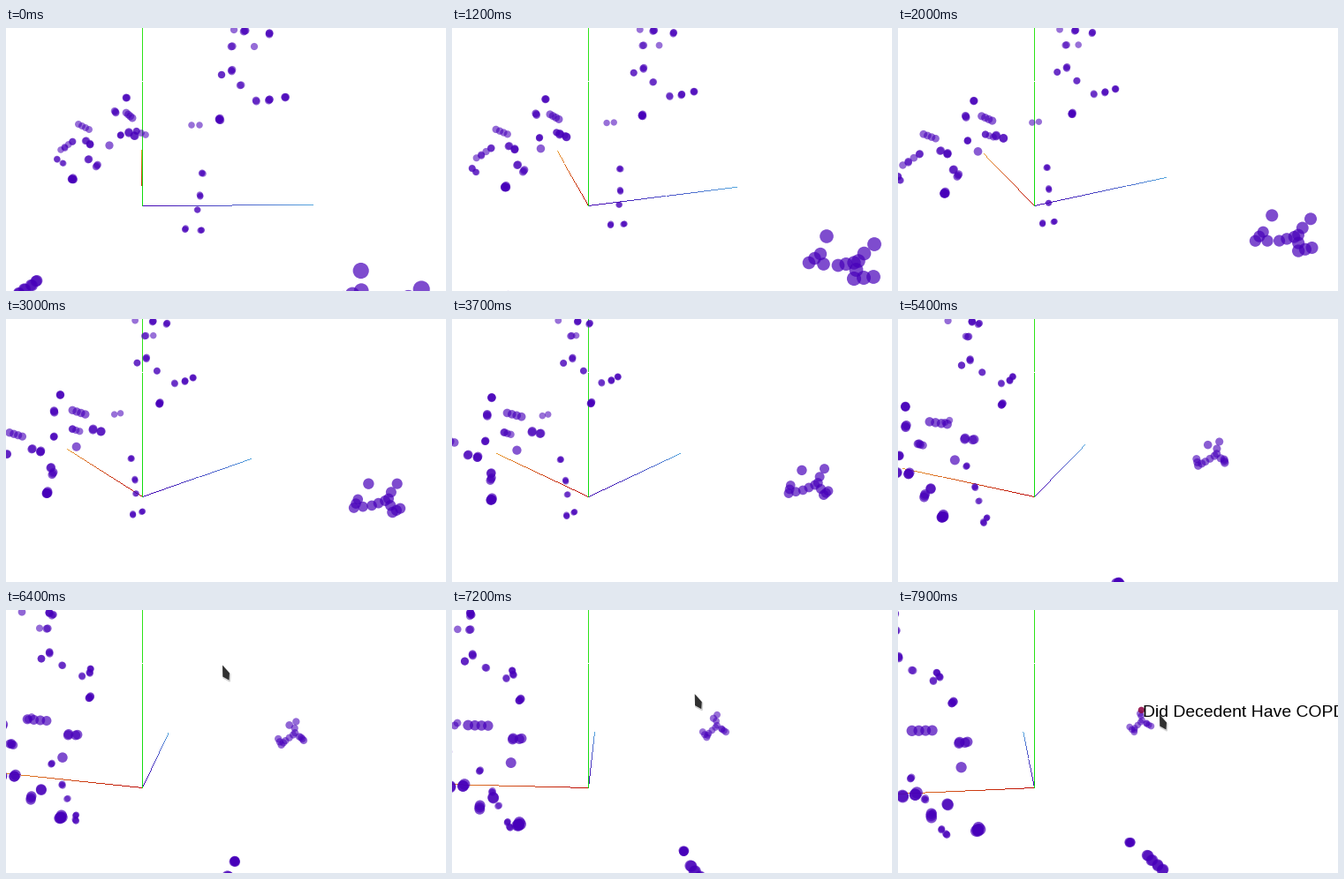
Recreate the animation shown at these times as a matplotlib script. Size 498 by 298 pixels, loop 8000 ms.

```python
import numpy as np
import matplotlib.pyplot as plt
from matplotlib.animation import FuncAnimation
from matplotlib.patches import Polygon

W, H, DPI = 498, 298, 100
FRAMES, STEP = 80, 100
CX, CY = 154.5, 201.5           # screen position of the orbit centre
SCALE, DIST = 194, 1.973        # projection scale and camera distance
SIN_E = 0.471                   # camera elevation
COS_E = np.sqrt(1 - SIN_E ** 2)
TURN = 12                       # degrees per second
DOT = 10.2                      # dot diameter at the orbit centre
INDIGO = (0.28, 0.0, 0.73)
PX = 72 / DPI
rng = np.random.default_rng(4)


def camera(t):
    """Rows giving right, up and relative depth of a point (x, y, z)."""
    a = np.radians(0.6 + TURN * t)
    c, s = np.cos(a), np.sin(a)
    right = np.array([-s, 0, c])
    away = np.array([c, 0, s])
    height = np.array([0, 1, 0])
    up = SIN_E * away + COS_E * height
    depth = (COS_E * away - SIN_E * height) / DIST
    return right, up, depth


def project(pts, t):
    right, up, depth = camera(t)
    w = 1 + pts @ depth
    x = CX + SCALE * (pts @ right) / w
    y = CY - SCALE * (pts @ up) / w
    return np.column_stack([x, y]), w


def locate(x0, y0, x1, t0, t1):
    """Point in space seen at (x0, y0) at t0 and in column x1 at t1."""
    r0, u0, d0 = camera(t0)
    r1, _, d1 = camera(t1)
    rhs = np.array([x0 - CX, CY - y0, x1 - CX])
    rows = [SCALE * r0 - rhs[0] * d0,
            SCALE * u0 - rhs[1] * d0,
            SCALE * r1 - rhs[2] * d1]
    return np.linalg.solve(rows, rhs)


def strand(t0, t1, n, copies, *keys):
    """n dots spread along the key points, each with a few close twins."""
    keys = np.array(keys, float)
    u = np.linspace(0, len(keys) - 1, n)
    line = np.column_stack([np.interp(u, range(len(keys)), k)
                            for k in keys.T])
    dots = []
    for dot in line:
        dots.append(dot)
        for _ in range(rng.integers((copies + 1) // 2, copies + 1) - 1):
            dots.append(dot + rng.uniform(-1.3, 1.3, 3))
    return [locate(*d, t0, t1) for d in dots]


# Key points are (x, y) at the first time and x at the second
points = np.array(
    # upper hook
    strand(0, 6.4, 9, 3, (298, 6, 53), (270, 3, 49), (255, 21, 46),
           (255, 48, 49), (244, 53, 40), (265, 65, 64), (283, 82, 86),
           (298, 81, 95), (316, 79, 96))
    + strand(0, 6.4, 2, 1, (258, 2, 18), (281, 21, 38))
    + strand(0, 6.4, 1, 6, (241.5, 103.5, 94.5))
    # column beside the vertical axis
    + strand(0, 6.4, 2, 2, (210, 110, 25), (219, 110, 29))
    + strand(0, 6.4, 5, 4, (222, 164, 52), (220, 190, 63), (217, 206, 70),
             (221, 229, 79), (203, 228, 79))
    # left cloud
    + strand(0, 4.5, 3, 4, (137, 79, 27), (124, 95, 24), (130, 121, 20))
    + strand(0, 4.5, 4, 1, (136, 96, 49), (143, 102, 67))
    + strand(0, 4.5, 3, 2, (148, 117, 41), (158, 121, 48))
    + strand(0, 4.5, 3, 2, (145, 122, 93), (139, 118, 83), (117, 133, 68))
    + strand(0, 4.5, 4, 3, (90, 128, 7), (95, 132, 19), (93, 149, 39),
             (103, 156, 36))
    + strand(0, 4.5, 1, 6, (75, 171, 45))
    + strand(0, 3, 4, 1, (82, 109, 4), (94, 115, 18.5))
    + strand(0, 3, 4, 2, (75, 129, 1), (62, 138, -21))
    + strand(0, 3, 2, 3, (58, 149, -27), (64, 153, -28))
    # passing close to the camera
    + strand(7.9, 0, 4, 2, (282, 278, 35), (300, 294, 15))
    + strand(6.4, 7.9, 1, 5, (259, 285, 262.5))
    # right cloud
    + strand(1.2, 4.5, 1, 1, (424, 236, 376))
    + strand(1.2, 4.5, 5, 1, (460, 264, 390), (455, 284, 398),
             (477, 282, 400))
    + strand(1.2, 4.5, 9, 1, (417, 256, 363), (404, 266, 363),
             (437, 269, 375), (455, 266, 387), (478, 245, 395)))
PICKED = len(points) - 1        # dot under the pointer near the end

fig = plt.figure(figsize=(W / DPI, H / DPI), dpi=DPI, facecolor="white")
ax = fig.add_axes([0, 0, 1, 1])
ax.axis("off")
layer = ax.imshow(np.ones((H, W, 3)), extent=(0, W, H, 0),
                  interpolation="nearest", aspect="auto", zorder=0)
ax.set_xlim(0, W)
ax.set_ylim(H, 0)

# Axis end, colour at the centre, colour at the end
AXES = np.array([
    [(1, 0, 0), (0.74, 0.03, 0), (0.92, 0.62, 0.2)],
    [(0, 0, 1), (0.27, 0, 0.7), (0.33, 0.65, 0.87)],
    [(0, 1, 0), (0.05, 0.86, 0.05), (0.2, 0.9, 0.1)],
])


def axis_pixels(t):
    """One pixel wide, colour-graded axis lines."""
    img = np.ones((H, W, 3))
    ends, depths = project(AXES[:, 0], t)
    for end, w, (_, near, far) in zip(ends, depths, AXES):
        n = int(np.abs(end - (CX, CY)).max()) + 1
        u = np.linspace(0, 1, n)[:, None]
        xy = np.floor((1 - u) * (CX, CY) + u * end).astype(int)
        f = u / (w * (1 - u) + u)
        f = u / w / (1 - u + u / w)
        ok = ((xy >= 0) & (xy < (W, H))).all(axis=1)
        img[xy[ok, 1], xy[ok, 0]] = ((1 - f) * near + f * far)[ok]
    return img


cloud = ax.scatter(np.zeros(len(points)), np.zeros(len(points)),
                   linewidths=0, zorder=2)
label = ax.text(0, 0, "Did Decedent Have COPD", family="Liberation Sans",
                size=19.4 * PX, color="black", va="baseline", zorder=3)

ARROW = np.array([(0, 0), (8, 9), (7.5, 17), (0.3, 13)])
shade = Polygon(ARROW, fc="#d4d4d4", ec="#d4d4d4", lw=1.5 * PX, zorder=4)
arrow = Polygon(ARROW, fc="#303030", ec="none", zorder=5)
ax.add_patch(shade)
ax.add_patch(arrow)


def smooth(t, start, end):
    u = np.clip((t - start) / (end - start), 0, 1)
    return u * u * (3 - 2 * u)


def draw(i):
    t = i * STEP / 1000
    layer.set_data(axis_pixels(t))

    xy, w = project(points, t)
    visible = w > 0.2
    w = np.where(visible, w, 1)
    rgba = np.empty((len(points), 4))
    rgba[:, :3] = INDIGO
    rgba[:, 3] = np.where(visible, np.clip(1 - 0.34 * w, 0.56, 0.7), 0)
    hover = t > 7.45
    if hover:
        rgba[PICKED] = (0.55, 0, 0.25, 0.85)
    cloud.set_offsets(xy)
    cloud.set_sizes((DOT / w * PX) ** 2)
    cloud.set_facecolors(rgba)

    label.set_visible(hover)
    label.set_position((xy[PICKED, 0] + 2, xy[PICKED, 1] + 7.5))

    tip = np.array([245, 62.5]) + smooth(t, 6.7, 7.6) * np.array([51, 56])
    arrow.set_xy(ARROW + tip)
    shade.set_xy(ARROW + tip + (0.8, 1.5))
    for part in (arrow, shade):
        part.set_visible(t > 5.95)
    return []


anim = FuncAnimation(fig, draw, frames=FRAMES, interval=STEP,
                     repeat=True, repeat_delay=0, blit=False)
plt.show()
```
